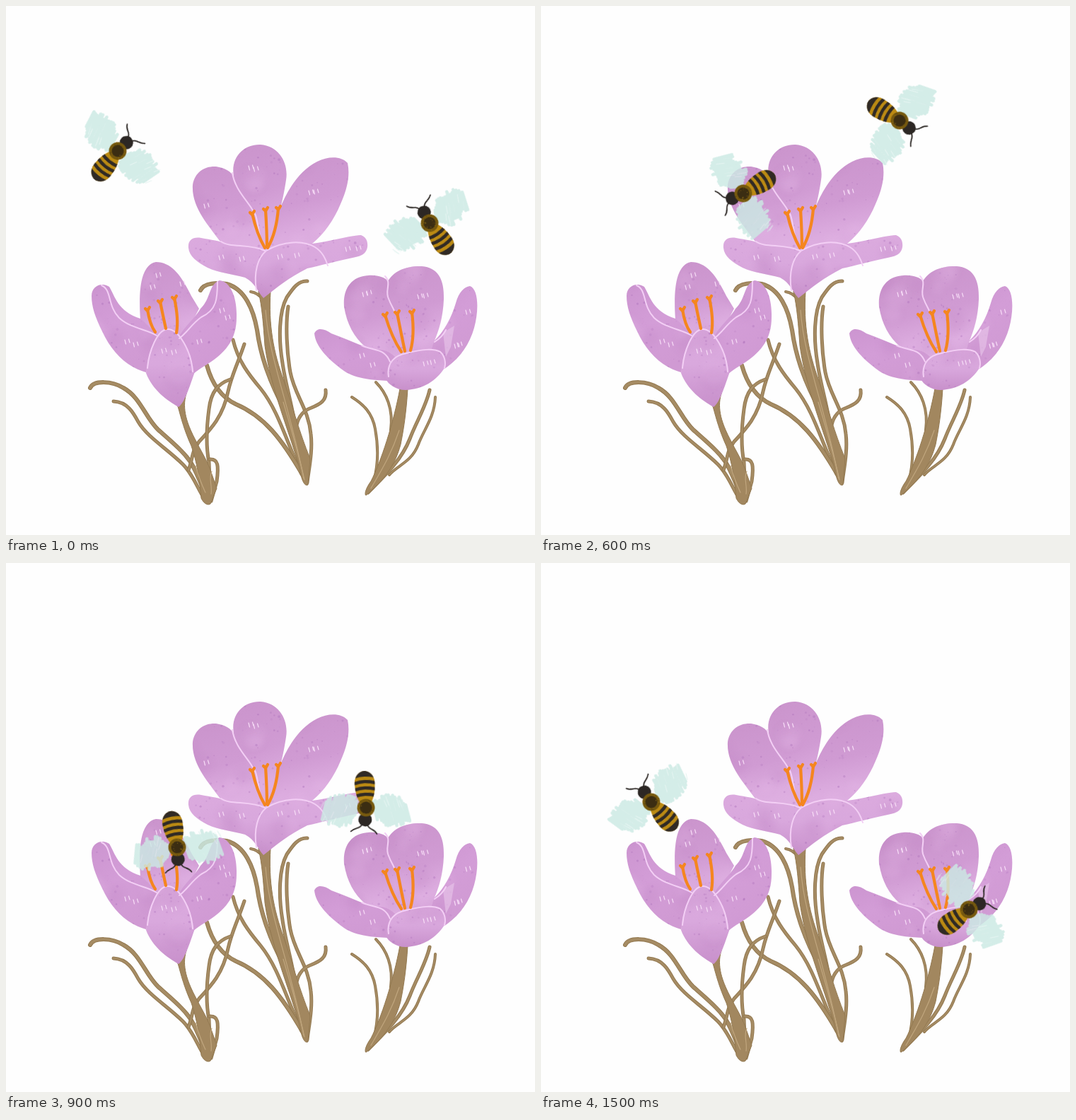
Write an HTML page that moves like this. It is 748x748 px and loops after 1.8 s.

```html
<!DOCTYPE html>
<html lang="en">
<head>
<meta charset="utf-8">
<title>Crocuses and bees</title>
<style>
html, body { margin: 0; width: 100%; height: 100%; overflow: hidden; background: #fefefe; }
svg { display: block; width: 100%; height: 100%; }
.stem { fill: none; stroke-linecap: round; stroke-linejoin: round; }
.vein { fill: none; stroke: #f3cff5; stroke-width: 2; stroke-linecap: round; }
.stamen { fill: none; stroke: #f5861f; stroke-width: 4.2; stroke-linecap: round; stroke-linejoin: round; }
.tick { fill: none; stroke: #f6dcf6; stroke-width: 1.2; stroke-linecap: round; }
.bee { animation: 1800ms step-end infinite; }
#beeA { animation-name: flyA; }
#beeB { animation-name: flyB; }
@keyframes flyA {
  0% { transform: translate(158px, 205px) rotate(39deg); }
  16.666% { transform: translate(322px, 138px) rotate(80deg); }
  33.333% { transform: translate(507px, 162px) rotate(121deg); }
  50% { transform: translate(509px, 346px) rotate(177deg); }
  66.666% { transform: translate(353px, 413px) rotate(253deg); }
  83.333% { transform: translate(156px, 338px) rotate(318deg); }
}
@keyframes flyB {
  0% { transform: translate(599px, 307px) rotate(-34deg); }
  16.666% { transform: translate(436px, 214px) rotate(-88deg); }
  33.333% { transform: translate(286px, 265px) rotate(-121deg); }
  50% { transform: translate(242px, 402px) rotate(-191deg); }
  66.666% { transform: translate(381px, 514px) rotate(-262deg); }
  83.333% { transform: translate(605px, 490px) rotate(-306deg); }
}
</style>
</head>
<body>
<svg id="stage" viewBox="0 0 748 748">
  <defs>
    <linearGradient id="back" x1=".4" y1="0" x2=".6" y2="1">
      <stop offset="0" stop-color="#cb95cd"/>
      <stop offset=".45" stop-color="#d09bd3"/>
      <stop offset=".75" stop-color="#dcacdf"/>
      <stop offset="1" stop-color="#dfb1e2"/>
    </linearGradient>
    <linearGradient id="side" x1="0" y1="0" x2=".5" y2="1">
      <stop offset="0" stop-color="#cc95d0"/>
      <stop offset=".5" stop-color="#d39dd7"/>
      <stop offset="1" stop-color="#d09ad3"/>
    </linearGradient>
    <linearGradient id="front" x1=".5" y1="0" x2=".5" y2="1">
      <stop offset="0" stop-color="#dbaade"/>
      <stop offset=".45" stop-color="#d9a8dd"/>
      <stop offset="1" stop-color="#c890cb"/>
    </linearGradient>
    <filter id="soft" x="-50%" y="-50%" width="200%" height="200%"><feGaussianBlur stdDeviation="5"/></filter>
    <clipPath id="belly"><path d="M-9 9C-13 17-15 28-14 39C-12 47-6 52 0 52C6 52 12 47 14 39C15 28 13 17 9 9Z"/></clipPath>
  </defs>
  <g id="stems"></g>
  <g id="flowers"></g>
  <g id="beeA" class="bee"></g>
  <g id="beeB" class="bee"></g>
</svg>
<script>
const NS = 'http://www.w3.org/2000/svg';
const $ = id => document.getElementById(id);

function add(parent, tag, attrs) {
  const el = document.createElementNS(NS, tag);
  for (const k in attrs) el.setAttribute(k, attrs[k]);
  parent.appendChild(el);
  return el;
}

function seeded(s) {
  return (a = 0, b = 1) => {
    s = (s * 16807) % 2147483647;
    return a + (b - a) * (s / 2147483647);
  };
}

// Stems and leaves: [width, path]
const leaves = [
  [6, 'M275 402C280 391 300 391 312 393C338 400 350 430 355 458C360 495 372 530 396 575'],
  [5, 'M321 472C328 502 344 522 360 541C385 572 395 612 418 662'],
  [6, 'M284 508C290 530 302 552 325 563C365 580 390 612 420 664'],
  [5, 'M426 389C412 388 404 402 397 412C386 432 385 470 391 505C395 535 404 560 410 600'],
  [5, 'M399 425C395 450 397 490 402 518C408 550 428 570 431 605C434 630 428 655 426 674'],
  [5, 'M452 543C454 558 444 563 432 568C420 572 414 580 411 592'],
  [4, 'M346 404C354 405 359 409 364 416'],
  [6, 'M119 540C124 529 150 530 166 540C190 553 197 582 215 599C235 617 254 632 264 650C270 662 276 675 282 692'],
  [5, 'M152 559C172 560 180 575 187 588C200 610 228 626 250 648C264 662 270 680 280 696'],
  [5, 'M337 478C328 505 319 522 314 545C307 580 290 598 273 616C262 630 264 642 258 656'],
  [5, 'M317 528C300 534 290 545 287 570C283 600 283 625 287 645L288 672'],
  [5, 'M288 641C300 640 301 650 298 672L290 700'],
  [4, 'M489 553C505 563 518 575 522 598C527 625 526 650 520 672'],
  [4, 'M523 532C538 547 548 570 544 600'],
  [5, 'M599 543C594 566 580 588 571 612C560 640 540 660 512 688'],
  [4, 'M607 553C606 582 590 600 583 620C573 646 552 650 542 663']
];
const trunks = [
  'M357 404L374 404C371 450 378 490 393 530C408 575 414 600 430 640L427 677C420 681 416 660 414 650C400 600 374 540 366 480C364 450 362 425 357 404Z',
  'M243 566L255 548C248 570 257 592 266 610C276 630 286 645 291 662L298 682L289 704C284 707 279 702 276 696C274 670 270 645 262 622C252 600 248 584 243 566Z',
  'M557 541L568 541C566 575 562 600 558 620C550 650 535 670 509 692C506 690 510 680 516 672C530 645 548 590 557 541Z'
];
for (const [w, d] of leaves) {
  add($('stems'), 'path', { class: 'stem', d, stroke: '#927850', 'stroke-width': w });
  add($('stems'), 'path', { class: 'stem', d, stroke: '#a68c64', 'stroke-width': w - 2 });
}
for (const d of trunks)
  add($('stems'), 'path', { class: 'stem', d, style: 'fill:#a2875f', stroke: '#937951', 'stroke-width': 1 });
for (const d of ['M367 430C372 500 400 560 421 668', 'M392 560C404 600 413 630 422 670', 'M268 650C272 665 276 675 282 688',
                 'M291 658C286 668 292 678 290 690', 'M556 600C546 630 535 650 516 682'])
  add($('stems'), 'path', { class: 'stem', d, stroke: '#c0a67e', 'stroke-width': 1.2 });

const flowers = [
  {
    box: [258, 195, 254, 218],
    petals: [
      ['back', 'M368 352L330 352L302 332C288 312 262 285 264 253C267 234 282 226 297 227C310 229 318 234 322 241L366 310Z'],
      ['back', 'M322 241C317 212 338 195 360 196C386 198 400 222 396 246C393 266 390 278 387 290L368 352C356 330 356 308 352 294C342 278 327 262 322 241Z'],
      ['back', 'M386 290C398 258 416 232 440 220C456 212 474 212 483 222C487 240 482 260 473 280C464 302 450 322 433 336L420 350L368 352Z'],
      ['front', 'M258 342C257 331 264 326 276 328C290 331 302 331 314 338C332 341 352 338 367 345C388 335 410 333 433 336C456 333 480 326 500 324C509 325 512 333 511 341C509 352 500 354 490 356C465 361 445 367 426 371C400 384 383 398 364 413C356 404 352 391 338 384C320 379 300 377 285 370C270 362 259 354 258 342Z']
    ],
    veins: ['M320 236C324 262 345 278 353 296C358 312 357 330 366 343', 'M304 333C316 342 345 336 366 346',
            'M354 402C350 376 356 356 368 346C392 332 420 331 437 341C448 348 452 358 455 367'],
    stamens: [[348, 293, 366, 342], [367, 288, 369, 341], [385, 286, 370, 342]],
    ticks: [[343, 226], [350, 228], [428, 261], [435, 260], [280, 280], [301, 353], [330, 355], [384, 352], [408, 350], [480, 341], [495, 340]]
  },
  {
    box: [121, 362, 206, 206],
    petals: [
      ['back', 'M190 443C187 400 191 366 212 362C238 362 252 390 262 410L273 428L246 480L214 480Z'],
      ['side', 'M121 410C121 396 135 390 146 397C154 410 158 432 190 442C200 450 206 458 214 464L198 518C170 510 150 490 136 460C126 440 121 425 121 410Z'],
      ['side', 'M246 465C254 452 268 440 275 428C290 414 286 394 302 388C316 389 327 410 326 440C326 470 312 488 290 503C280 510 268 516 265 521Z'],
      ['front', 'M198 519C200 490 212 458 228 457C246 459 262 488 266 520C259 540 252 562 244 567C228 558 207 543 198 519Z']
    ],
    veins: ['M135 395C150 401 143 424 160 441C176 456 200 457 213 466', 'M299 390C299 414 298 430 276 440C262 450 256 462 245 470',
            'M200 512C202 488 214 458 228 457C244 456 262 488 264 517'],
    stamens: [[200, 429, 211, 461], [218, 418, 226, 456], [238, 413, 241, 462]],
    ticks: [[212, 378], [204, 395], [246, 390], [168, 472], [180, 476], [220, 485], [234, 487], [302, 428], [310, 438], [270, 472]]
  },
  {
    box: [436, 367, 231, 177],
    petals: [
      ['back', 'M478 425C476 398 490 382 512 381C526 380 536 384 540 389C540 402 536 408 544 418L572 505L540 508L508 482C492 468 482 450 478 425Z'],
      ['back', 'M540 389C548 375 566 367 588 368C610 370 620 385 619 415C618 440 612 460 605 475L600 500L565 502C554 470 550 440 542 416C537 403 542 400 540 389Z'],
      ['side', 'M605 474C620 460 630 440 636 420C640 405 648 397 656 396C668 400 669 430 662 455C655 480 640 500 620 513L598 500Z'],
      ['side', 'M436 463C440 454 450 456 460 463C480 470 500 480 520 486C540 484 547 494 555 500L540 530C518 529 494 527 478 516C460 503 438 484 436 463Z'],
      ['front', 'M537 527C540 505 550 494 566 492C590 485 612 484 619 494C622 500 621 506 620 512C608 530 590 542 565 543C552 543 540 535 537 527Z']
    ],
    veins: ['M536 382C546 392 535 402 541 414C545 425 550 430 550 435', 'M541 524C538 504 550 494 566 491C590 485 604 484 614 489C621 495 622 505 620 512',
            'M503 480C520 488 535 483 543 503', 'M606 475C614 470 618 466 622 458'],
    stamens: [[536, 437, 559, 489], [553, 434, 564, 488], [574, 433, 572, 487]],
    ticks: [[504, 405], [510, 403], [582, 408], [590, 407], [500, 492], [515, 505], [590, 503], [600, 501], [650, 430], [634, 478], [638, 476]]
  }
];

function drawFlower(f, n) {
  const rnd = seeded(71 + n * 97);
  const g = add($('flowers'), 'g', {});
  const clip = add(g, 'clipPath', { id: 'bloom' + n });
  for (const [tone, d] of f.petals) {
    add(g, 'path', { d, fill: `url(#${tone})` });
    add(clip, 'path', { d });
  }
  // watercolour blotches and speckles
  const wash = add(g, 'g', { 'clip-path': `url(#bloom${n})` });
  const [x, y, w, h] = f.box;
  const spot = () => ({ cx: rnd(x, x + w).toFixed(1), cy: rnd(y, y + h).toFixed(1) });
  for (let i = 0; i < 26; i++)
    add(wash, 'circle', { ...spot(), r: rnd(7, 18), fill: i % 2 ? '#e6b9e8' : '#bf84c3', opacity: .2, filter: 'url(#soft)' });
  for (let i = 0; i < 170; i++)
    add(wash, 'circle', { ...spot(), r: rnd(.4, 1.9), fill: '#ab70b9', opacity: rnd(.15, .45) });
  if (n === 2) add(wash, 'path', { d: 'M618 462L634 452L629 482L622 496Z', fill: '#e9c9ec', opacity: .6 });

  for (const d of f.veins) add(g, 'path', { class: 'vein', d });
  f.stamens.forEach(([a, b, c, e], i) => {
    const bend = [-2, 1, 5][i];
    add(g, 'path', { class: 'stamen', d: `M${a} ${b}Q${(a + c) / 2 + bend} ${(b + e) / 2 + 6} ${c} ${e}` });
    add(g, 'path', { class: 'stamen', d: `M${a - 3} ${b - 1}L${a} ${b + 2}L${a + 3} ${b - 3}` });
  });
  for (const [a, b] of f.ticks)
    add(g, 'path', { class: 'tick', d: `M${a} ${b}l1.500 6m4-7l1.500 5` });
}
flowers.forEach(drawFlower);

// Bee centred on its thorax, abdomen straight down, head slightly turned
function drawBee(g, seed) {
  const rnd = seeded(seed);
  const wings = add(g, 'g', { opacity: .82, 'stroke-linecap': 'round', stroke: '#cbe9e3', transform: 'rotate(3)' });
  for (const side of [-1, 1]) {
    for (let i = 0; i < 16; i++) {
      const t = i / 15, x = side * (13 + 46 * t);
      const h = 9 + 11 * Math.sin(Math.PI * Math.pow(t, .75) * .92);
      const lean = side * 3;
      add(wings, 'line', { x1: x + lean, y1: -4 - h + rnd(-4, 4), x2: x - lean, y2: -4 + h + rnd(-4, 4), 'stroke-width': 4.5 });
    }
    for (let i = 0; i < 9; i++) {
      const x = side * rnd(24, 67), y = rnd(-24, 10);
      add(wings, 'line', { x1: x + side * 2, y1: y, x2: x - side * 2, y2: y + rnd(7, 14), 'stroke-width': .8,
        stroke: i % 2 ? '#e9f7f4' : '#d3ede8' });
    }
  }
  const belly = add(g, 'g', { 'clip-path': 'url(#belly)' });
  add(belly, 'rect', { x: -16, y: 6, width: 32, height: 50, fill: '#bb8a13' });
  for (const y of [17, 26, 35])
    add(belly, 'path', { d: `M-17 ${y - 1}Q0 ${y + 5} 17 ${y - 1}`, fill: 'none', stroke: '#302a25', 'stroke-width': 4.4 });
  add(belly, 'path', { d: 'M-17 41Q0 47 17 41V56H-17Z', fill: '#302a25' });
  const head = add(g, 'g', { transform: 'rotate(7)' });
  add(head, 'circle', { cy: -17, r: 9.5, fill: '#2c2724' });
  add(head, 'path', { d: 'M-4-24C-6-31-13-28-18-36M4-24C6-31 13-28 19-35', fill: 'none', stroke: '#2c2724', 'stroke-width': 1.7, 'stroke-linecap': 'round' });
  add(g, 'circle', { r: 12.5, fill: '#76590f' });
  add(g, 'circle', { r: 8.5, fill: '#3b2d12' });
  for (let i = 0; i < 26; i++) {
    const a = rnd(0, 6.28), r = rnd(5, 12);
    const x = r * Math.cos(a), y = r * Math.sin(a);
    add(g, 'line', { x1: x, y1: y, x2: x + rnd(-2, 2), y2: y + rnd(-2, 2), stroke: i % 2 ? '#947018' : '#4c390f', 'stroke-width': .9 });
  }
}
drawBee($('beeA'), 311);
drawBee($('beeB'), 523);
</script>
</body>
</html>
```
